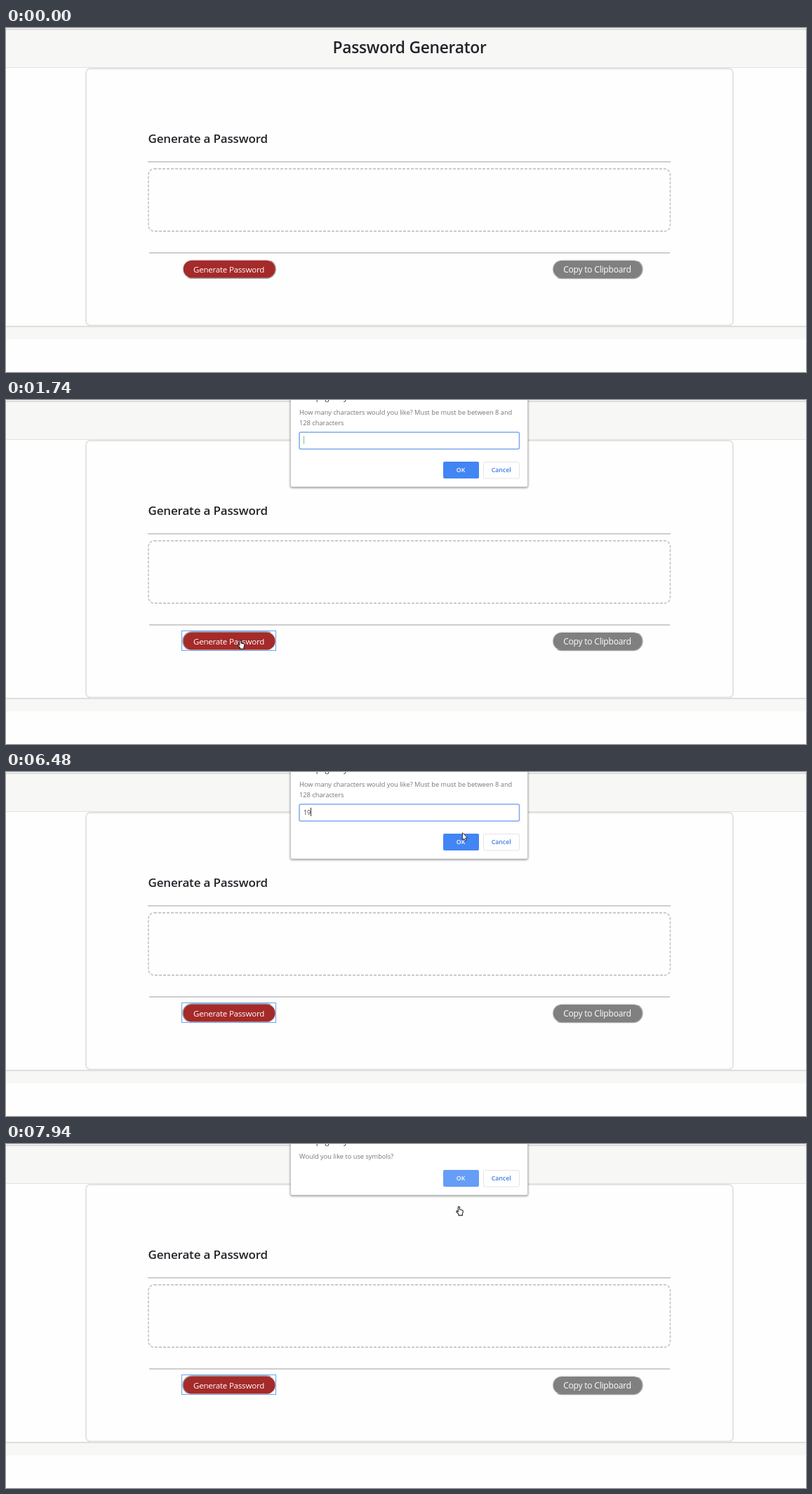
An HTML page that plays this animation: 1140x491 px, repeating every 8 s.

```html
<!DOCTYPE html>
<html lang="en">
<head>
<meta charset="utf-8">
<title>Password Generator</title>
<style>
  html, body { margin: 0; width: 100%; height: 100%; overflow: hidden; background: #fefefe; }
  svg { display: block; width: 100vw; height: 100vh; }
  text { font: 9.28px "Open Sans", "Noto Sans", sans-serif; fill: #757575; }
  .mid { text-anchor: middle; }
  .head { font-weight: 600; fill: #212529; }
  .h1 { font-size: 22.8px; letter-spacing: -.28px; }
  .h2 { font-size: 17px; letter-spacing: -.16px; }
  .label { font-size: 11.5px; letter-spacing: -.2px; fill: #fff; }
  .ok, .cancel { font-size: 8.7px; font-weight: 600; text-anchor: middle; }
  .ok { fill: #fff; }
  .cancel { fill: #3b7de0; }
  .title { font-size: 11px; fill: #333; }
  .typed { font-size: 8.8px; fill: #444; }
  .panel { fill: #fff; stroke: #c4c4c4; stroke-width: .8; filter: drop-shadow(0 1px 1.5px rgba(0,0,0,.45)); }
</style>
</head>
<body>
<svg viewBox="0 0 1140 491">
  <defs>
    <linearGradient id="outset" x2="1" y2="1">
      <stop offset=".5" stop-color="#e4e4e4"/><stop offset=".5" stop-color="#a6a6a6"/>
    </linearGradient>
    <linearGradient id="inset" x2="1" y2="1">
      <stop offset=".5" stop-color="#9a9a9a"/><stop offset=".5" stop-color="#e4e4e4"/>
    </linearGradient>
  </defs>

  <rect width="1140" height="57" fill="#f7f7f5"/>
  <path d="M0 2H1140" stroke="#dcdcdc" stroke-width="2"/>
  <path d="M0 56.5H1140" stroke="#e2e2e0"/>
  <rect y="426" width="1140" height="18.5" fill="#f7f7f6"/>
  <path d="M0 426H1140" stroke="#dedede" stroke-width="2"/>
  <rect x="114" y="58" width="922" height="366.5" rx="6" fill="#fefefe" stroke="#e3e3e3" stroke-width="2"/>
  <text class="head h1 mid" x="575" y="36">Password Generator</text>
  <text class="head h2" x="202.5" y="164">Generate a Password</text>
  <path d="M202 191H947M204 321H946" stroke="#cecece" stroke-width="1.8"/>
  <rect x="203" y="201" width="743.5" height="89" rx="8" fill="none" stroke="#cbcbcb" stroke-width="1.8" stroke-dasharray="4 2"/>

  <rect id="make" x="252" y="331" width="132.3" height="26.3" rx="13" fill="#a52a2a" stroke-width="1.4"/>
  <rect id="focus" x="250.5" y="329.5" width="134" height="28" fill="none" stroke="#6ba0f0"/>
  <text class="label mid" x="317.5" y="349">Generate Password</text>
  <rect x="779" y="331.3" width="128" height="26.3" rx="13" fill="#808080" stroke="url(#outset)" stroke-width="1.4"/>
  <text class="label mid" style="font-size:12px" x="842.5" y="349">Copy to Clipboard</text>

  <g id="ask"></g>
  <g id="confirm"></g>

  <path id="arrow" d="M.4.6V11L2.7 8.9 4.3 12.3 6 11.5 4.5 8.2H7.7Z" fill="#fff" stroke="#222" stroke-width=".9"/>
  <path id="hand" d="M3.3 1.6Q4.4.2 5.5 1.6V5L9 5.8Q10.5 6.3 10.4 8L9.4 11V13.4H4V11.6L.8 8.2Q.8 6.6 2.1 7L3.3 8Z" fill="#fff" stroke="#222" stroke-width="1.1"/>
</svg>
<script>
const $ = id => document.getElementById(id);
const show = (el, on) => el.setAttribute('visibility', on ? 'visible' : 'hidden');

function buildDialog(id, bottom, okColor, body) {
  const y = bottom - 36;
  $(id).innerHTML = `
    <rect class="panel" x="405.5" y="-20" width="338" height="${bottom + 20}" rx="2"/>
    <text class="title" x="418" y="-.5">This page says</text>${body}
    <rect class="okBox" x="623" y="${y}" width="51" height="24" rx="2" fill="${okColor}"/>
    <text class="ok" x="648" y="${y + 15}">OK</text>
    <rect x="680.5" y="${y + .5}" width="51" height="23.5" rx="2" fill="#fff" stroke="#e2e4e8"/>
    <text class="cancel" x="705.7" y="${y + 15}">Cancel</text>`;
}

buildDialog('ask', 124, '#4285f4', `
  <text x="418" y="21">How many characters would you like? Must be must be between 8 and</text>
  <text x="418" y="36">128 characters</text>
  <rect x="418" y="46" width="313.5" height="24" rx="2" fill="#fff" stroke="#7fa9ee" stroke-width="1.5"/>
  <text class="typed" id="typed" x="424" y="61"></text>
  <rect id="caret" y="51" width="1" height="12"/>`);
buildDialog('confirm', 73, '#669df6', '<text x="418" y="21">Would you like to use symbols?</text>');

// Each row holds from its time until the next one.
const askShown = [[0, 0], [1590, .5], [1665, .8], [1740, 1], [7020, .92], [7095, .82], [7170, .68], [7250, 0]];
const confirmShown = [[0, 0], [7095, .4], [7170, .65], [7250, 1]];
const typing = [[0, ''], [4220, '1'], [5000, '19']];
const blink = [[0, 1], [2130, 0], [2660, 1], [3130, 0], [3670, 1], [4770, 0], [5000, 1], [5550, 0], [6080, 1], [6630, 0]];
const pointer = [
  [0], [360, 'arrow', 763, 402], [430, 'arrow', 651, 385], [660, 'arrow', 500, 358],
  [740, 'hand', 370, 337], [970, 'hand', 358, 339], [1050, 'hand', 346, 341], [1120, 'hand', 337, 342], [1200, 'hand', 329.5, 342],
  [2510, 'arrow', 345, 325], [2590, 'arrow', 375, 290], [2660, 'arrow', 405, 255], [2740, 'arrow', 432, 220],
  [2990, 'arrow', 445, 192], [3060, 'arrow', 462, 158], [3130, 'arrow', 476, 126], [3280, 'arrow', 528, 62], [3360],
  [5850, 'arrow', 600, 29], [5930, 'arrow', 628, 27], [6000, 'arrow', 648, 34], [6080, 'arrow', 662, 43],
  [6250, 'arrow', 660, 55], [6330, 'arrow', 657, 66], [6400, 'arrow', 653, 78], [6480, 'arrow', 650, 86],
  [6560, 'hand', 646, 90], [6630, 'hand', 643.5, 92], [7940, 'hand', 641, 88.5]
];
const at = (rows, t) => rows.findLast(row => row[0] <= t);

function placeDialog(id, shown) {
  const el = $(id), away = 1 - shown, scale = 1 + away * .04;
  el.setAttribute('opacity', shown);
  el.setAttribute('transform', `translate(574.5 ${-23 * away}) scale(${scale}) translate(-574.5 0)`);
}

function draw(t) {
  const pressed = t >= 1370;
  show($('focus'), pressed);
  $('make').setAttribute('stroke', `url(#${pressed ? 'inset' : 'outset'})`);

  placeDialog('ask', at(askShown, t)[1]);
  placeDialog('confirm', at(confirmShown, t)[1]);
  const typed = at(typing, t)[1], caret = $('caret');
  $('typed').textContent = typed;
  caret.setAttribute('x', 424 + 5 * typed.length);
  caret.setAttribute('fill', typed ? '#333' : '#7cc77c');
  caret.setAttribute('opacity', at(blink, t)[1]);
  document.querySelector('#ask .okBox').setAttribute('fill', t >= 6860 ? '#3f80ee' : '#4285f4');

  const [, kind, x, y] = at(pointer, t);
  for (const id of ['arrow', 'hand']) {
    show($(id), id === kind);
    if (id === kind) $(id).setAttribute('transform', `translate(${x} ${y})`);
  }
}

function tick() {
  draw(performance.now() % 8000);
  requestAnimationFrame(tick);
}
tick();
</script>
</body>
</html>
```
